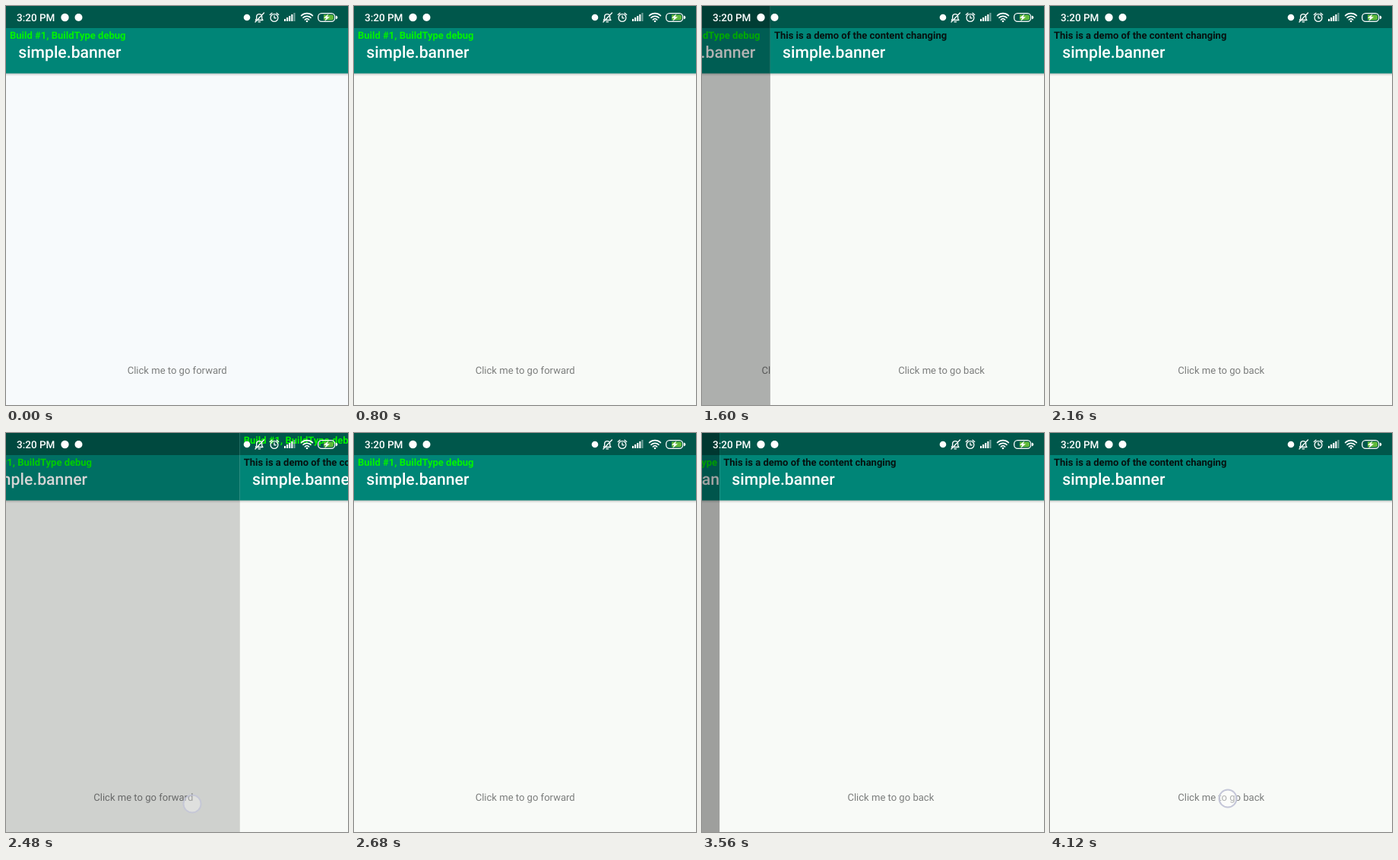
An HTML page that plays this animation: 450x524 px, repeating every 4.2 s.

```html
<!DOCTYPE html>
<html lang="en">
<head>
<meta charset="utf-8">
<title>simple.banner</title>
<style>
  html, body { margin: 0; width: 100%; height: 100%; overflow: hidden; background: #f8faf8; }
  svg { display: block; width: 450px; height: 524px; }
  text { font-family: Roboto, sans-serif; text-rendering: geometricPrecision; white-space: pre; }
  .title { font-size: 21.2px; font-weight: 500; fill: #fff; }
  .banner { font-size: 13px; font-weight: 700; }
  .label { font-size: 13.05px; fill: #7b7d7c; text-anchor: middle; }
  .clock { font-size: 13.5px; font-weight: 500; fill: #fff; }
  .line { fill: none; stroke: #fff; stroke-width: 1.3; stroke-linecap: round; stroke-linejoin: round; }
</style>
</head>
<body>
<svg id="stage" viewBox="0 0 450 524" xmlns="http://www.w3.org/2000/svg">
  <defs>
    <linearGradient id="shade" x2="0" y2="1">
      <stop stop-color="#000" stop-opacity=".22"/>
      <stop offset="1" stop-color="#000" stop-opacity="0"/>
    </linearGradient>
  </defs>
  <g id="home"></g>
  <rect id="dim" width="450" height="524"/>
  <g id="next"></g>
  <g id="status" fill="#fff">
    <text class="clock" x="14" y="20">3:20 PM</text>
    <circle cx="77.5" cy="15" r="5.2"/>
    <circle cx="95.5" cy="15" r="5"/>
    <circle cx="317" cy="15" r="4.3"/>
    <g class="line">
      <path d="M328.5 18.5h9.5l-1.3-2v-3.2a3.6 3.6 0 0 0-7 0v3.2zM332 20.8h2.6M328 21L339.5 9"/>
      <circle cx="353" cy="15.5" r="4.9"/>
      <path d="M353 12.8v3h2.3M347.3 11.6l2.7-2.3M358.7 11.6L356 9.3"/>
      <path d="M388.6 12.6a10.5 10.5 0 0 1 14.8 0M391 15.4a7 7 0 0 1 10 0M393.4 18a3.7 3.7 0 0 1 5.2 0" stroke-width="1.7"/>
    </g>
    <circle cx="396" cy="20" r="1.3"/>
    <g id="bars"></g>
    <rect class="line" x="410.7" y="9.6" width="22" height="10.8" rx="4.6"/>
    <path d="M434 12.5q2.4 .6 2.4 2.5t-2.4 2.5z"/>
    <path d="M418 11.5h10.8a2.3 2.3 0 0 1 2.3 2.3v2.4a2.3 2.3 0 0 1-2.3 2.3H418z" fill="#5fb83a"/>
    <path d="M424.4 10.2l-6.6 5.6h3.4l-2 4.4 6.8-6h-3.5z"/>
  </g>
  <circle id="touch" r="11.5" fill="#fff" fill-opacity=".4" stroke="#c4c6d8" stroke-width="2"/>
</svg>
<script>
const LOOP = 4200, STEP = 72.38, WIDTH = 450, SLIDE = 207;
const $ = id => document.getElementById(id);
const clamp = v => Math.max(0, Math.min(1, v));
const easeOut = v => 1 - (1 - clamp(v)) ** 3;

// Page changes: start time and direction
const moves = [[1514, 1], [2414, -1], [3430, 1]];
// Taps: x, y, from, to, opacity
const taps = [
  [241, 487, 1300, 1500, .8],
  [245, 487, 2250, 2510, .85],
  [241, 488, 3330, 3470, .7],
  [234, 480, 4040, LOOP, 1]
];

const page = (text, color, label) => `
  <rect class="body" width="450" height="524" fill="#f8faf7"/>
  <rect y="88" width="450" height="4" fill="url(#shade)"/>
  <rect width="450" height="88.5" fill="#008577"/>
  <rect width="450" height="29" fill="#00574b"/>
  <text class="title" x="16.2" y="67.5">simple.banner</text>
  <text class="banner" x="5" y="43" fill="${color}">${text}</text>
  <text class="label" x="225.2" y="483">${label}</text>`;

const build = 'Build #1, BuildType debug';
$('home').innerHTML = page(build, '#00f400', 'Click me to go forward');
$('next').innerHTML = page('This is a demo of the content changing', '#061210', 'Click me to go back') +
  `<text id="drop" class="banner" x="5" fill="#00f400">${build}</text>`;
$('bars').innerHTML = [3, 5, 7, 9, 11].map((h, i) =>
  `<rect x="${366 + i * 3.1}" y="${20 - h}" width="2.1" height="${h}" opacity="${i < 4 ? 1 : .45}"/>`).join('');
const body = $('home').querySelector('.body');

const tickAt = n => 40 * Math.round(n * STEP / 40);
function hold(t) {
  let n = Math.floor(t / STEP) + 1;
  while (tickAt(n) > t) n--;
  return tickAt(n);
}

function draw(time) {
  const t = hold(time);
  const [start, dir] = moves.filter(m => m[0] <= t).pop() || [0, -1];
  const front = easeOut((t - start) / SLIDE);
  // The page below trails the one on top
  const back = front - .079 * Math.min(1, 4 * front, 20 * (1 - front));
  const place = p => start === 0 ? 0 : dir > 0 ? p : 1 - p;
  const over = place(front), under = place(back);

  $('home').setAttribute('transform', `translate(${-112.5 * under} 0)`);
  $('next').setAttribute('transform', `translate(${WIDTH * (1 - over)} 0)`);
  $('next').setAttribute('visibility', over > 0 ? 'visible' : 'hidden');
  $('dim').setAttribute('opacity', .42 * under);
  $('drop').setAttribute('y', dir < 0 ? 43 - 44 * (1 - clamp((t - start) / 188)) : -20);

  const warm = clamp(t / 640);
  body.setAttribute('fill', `rgb(${247 + warm}, 250, ${252 - 5 * warm})`);

  const tap = taps.find(p => t >= p[2] && t < p[3]);
  $('touch').setAttribute('opacity', tap ? tap[4] : 0);
  if (tap) $('touch').setAttribute('transform', `translate(${tap[0]} ${tap[1]})`);
}

const origin = performance.now();
function loop() {
  draw((performance.now() - origin) % LOOP);
  requestAnimationFrame(loop);
}
loop();
</script>
</body>
</html>
```
